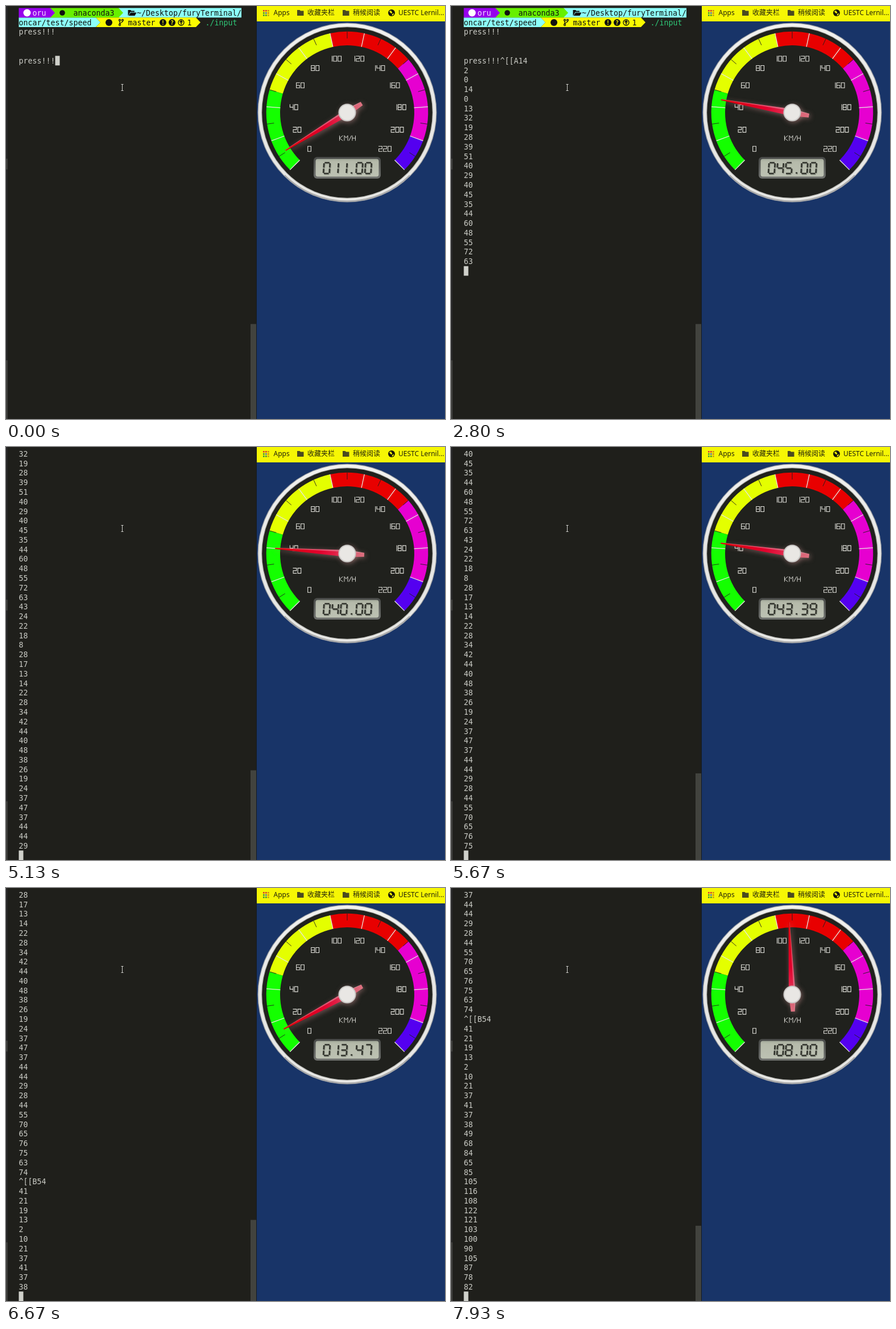
An HTML page that plays this animation: 772x725 px, repeating every 8000 ms.

```html
<!DOCTYPE html>
<html lang="en">
<head>
<meta charset="utf-8">
<title>Terminal and speedometer</title>
<style>
html, body { margin: 0; width: 100%; height: 100%; overflow: hidden; background: #1f1f1b; }
svg { display: block; width: 100vw; height: 100vh; }
.mono { font: 13.29px "DejaVu Sans Mono", monospace; white-space: pre; }
.bar { font: 12px "Noto Sans", "Noto Sans CJK SC", "Noto Sans CJK", sans-serif; fill: #22220a; }
.shadow { filter: drop-shadow(2px 2px 4px rgba(200, 143, 143, .5)); }
</style>
</head>
<body>
<svg viewBox="0 0 772 725" xmlns="http://www.w3.org/2000/svg">
  <defs>
    <linearGradient id="metal" x1="0" y1="0" x2="0" y2="1">
      <stop offset="0" stop-color="#f2f2f0"/><stop offset=".5" stop-color="#e6e6e4"/><stop offset="1" stop-color="#e9e9e6"/>
    </linearGradient>
    <linearGradient id="lcd" x1="0" y1="0" x2="0" y2="1">
      <stop offset="0" stop-color="#a3a99a"/><stop offset=".15" stop-color="#b5baaa"/><stop offset="1" stop-color="#bdc2b3"/>
    </linearGradient>
    <linearGradient id="lcdFrame" x1="0" y1="0" x2="0" y2="1">
      <stop offset="0" stop-color="#484a48"/><stop offset="1" stop-color="#70726f"/>
    </linearGradient>
    <linearGradient id="needleFill" gradientUnits="userSpaceOnUse" x1="0" y1="-127" x2="0" y2="30">
      <stop offset="0" stop-color="#dc0008"/><stop offset=".5" stop-color="#e2002c"/><stop offset=".8" stop-color="#e23658"/><stop offset="1" stop-color="#dc7482"/>
    </linearGradient>
  </defs>

  <rect width="772" height="725" fill="#1f1f1b"/>
  <g id="terminal" class="mono" fill="#cbccc6">
    <g id="prompt" fill="#101010">
      <path d="M198 3.5H414V20.3H198ZM22.5 20.3H158L166 28.7L158 37H22.5Z" fill="#8cfffa"/>
      <path d="M78 3.5H198L206 12L198 20.3H78Z" fill="#67f000"/>
      <path d="M22.5 3.5H78L86 12L78 20.3H22.5Z" fill="#9600ec"/>
      <path d="M158 20.3H334L342 28.7L334 37H158L166 28.7Z" fill="#fafa00"/>
      <circle cx="37" cy="12" r="6.5" fill="#fff"/>
      <circle cx="99" cy="12" r="4.8"/>
      <circle cx="181" cy="29" r="6"/>
      <path d="M214.5 17V7H219L220.5 8.5H226V10.5H218.5L215.5 16ZM219 11.5H229.5L226.5 17H215.5Z"/>
      <g fill="none" stroke="#101010" stroke-width="1.3">
        <path d="M200 26V32M205 26.5C205 30 200 28.5 200 32"/>
        <circle cx="200" cy="25" r="1.5"/><circle cx="200" cy="33" r="1.5"/><circle cx="205" cy="25" r="1.5"/>
        <circle cx="308" cy="29" r="5"/><path d="M308 32.5V26M305.5 28.5L308 26L310.5 28.5" stroke-width="1.7"/>
      </g>
      <circle cx="276" cy="29" r="6"/><circle cx="292" cy="29" r="6"/>
      <g fill="#fafa00" font-size="10" font-weight="bold" text-anchor="middle">
        <text x="276" y="32.7">!</text><text x="292" y="32.7">?</text>
      </g>
      <text x="46.5" y="16.9" fill="#f4e6ff">oru</text>
      <text x="118.5" y="16.9">anaconda3</text>
      <text x="230" y="16.9">~/Desktop/furyTerminal/</text>
      <text x="22.5" y="33.7">oncar/test/speed</text>
      <text x="214.5" y="33.7">master</text>
      <text x="318.5" y="33.7">1</text>
      <text x="350.5" y="33.7" fill="#2fc878">./input</text>
    </g>
    <rect id="cursor" width="8" height="16.8" fill="#cfd0ca"/>
  </g>
  <path d="M202.5 137.5H206.5M204.5 138V148M202.5 148.5H206.5" fill="none" stroke="#d0d0cc"/>
  <rect width="3" height="725" fill="#262626"/>
  <path d="M0 268H3V287H0ZM0 622H3V725H0Z" fill="#3d3d3b"/>
  <rect id="thumb" x="430" width="10" fill="#42433e"/>
  <rect x="440" width="1" height="725" fill="#141a22"/>

  <rect x="441" y="27" width="331" height="698" fill="#183468"/>
  <rect x="441" width="331" height="27" fill="#f6f604"/>
  <g id="apps"></g>
  <g fill="#4a4a20">
    <path id="folder" d="M512 7H516.5L518 8.5H523.5V17H512Z"/>
    <use href="#folder" x="80"/>
  </g>
  <circle cx="678" cy="12" r="6" fill="#17170c"/>
  <path d="M674 9.5C676 7.5 678 8 678 9.5S680 11 679 12.5S675 11.5 674 9.5M679 14.5L682 12.5C682.5 15 680 17 678.5 16.5Z" fill="#f6f604"/>
  <g class="bar">
    <text x="470.5" y="16.3">Apps</text>
    <text x="530" y="16.3">收藏夹栏</text>
    <text x="610" y="16.3">稍候阅读</text>
    <text x="690" y="16.3">UESTC Lernil...</text>
  </g>

  <g transform="translate(600 187)">
    <circle r="157.5" fill="#9b9ea2"/>
    <circle r="156.3" fill="url(#metal)"/>
    <path d="M-110 110A155.6 155.6 0 0 0 110 110" fill="none" stroke="#aaa" stroke-width="2"/>
    <circle r="151" fill="#b4b4b0"/>
    <circle r="149.8" fill="#20211d"/>
    <g id="dial"></g>
    <rect x="-59" y="78" width="118" height="38" rx="6" fill="url(#lcdFrame)"/>
    <rect x="-55.5" y="81.5" width="111" height="31" rx="4" fill="url(#lcd)"/>
    <path id="digitShade" transform="translate(8.5 1.2) skewX(-4)" fill="none" stroke="#8f9487" stroke-width="2.8"/>
    <path id="digits" transform="translate(7.5 0) skewX(-4)" fill="none" stroke="#33352e" stroke-width="2.7"/>
    <g class="shadow">
      <g id="needle">
        <path d="M-1 -127H1L6 0L3.5 30H-3.5L-6 0Z" fill="url(#needleFill)"/>
        <path d="M.5 -127H1L6 0L3.5 30Z" fill="#d8f0f0" fill-opacity=".33"/>
      </g>
    </g>
    <g class="shadow">
      <circle r="15.5" fill="#c9c8c6"/>
      <circle r="13.5" fill="#e9e7e4"/>
    </g>
  </g>
</svg>
<script>
const LOOP = 8000, FPS = 15 / 1000, ROUNDING = 4, ROW = 16.78, ROWS = 43, LEFT = 22.5, CHAR = 8;
const $ = id => document.getElementById(id);

function add(parent, tag, attrs, text) {
  const node = document.createElementNS('http://www.w3.org/2000/svg', tag);
  for (const key in attrs) node.setAttribute(key, attrs[key]);
  if (text) node.textContent = text;
  return parent.appendChild(node);
}

// Seven-segment lettering
const SEGMENTS = ['abcdef', 'bc', 'abdeg', 'abcdg', 'bcfg', 'acdfg', 'acdefg', 'abc', 'abcdefg', 'abcdfg'];
function segmentDigit(digit, x, y, w, h, gap) {
  const flat = dy => `M${x + gap} ${y + dy}h${w - 2 * gap}`;
  const tall = (dx, dy) => `M${x + dx} ${y + dy + gap}v${h / 2 - 2 * gap}`;
  const shape = {
    a: flat(0), b: tall(w, 0), c: tall(w, h / 2), d: flat(h),
    e: tall(0, h / 2), f: tall(0, 0), g: flat(h / 2)
  };
  return [...SEGMENTS[digit]].map(s => shape[s]).join('');
}

// Dial: 220 units over 270 degrees
const angle = value => value * 270 / 220 - 135;
function polar(value, r) {
  const a = angle(value) * Math.PI / 180;
  return [r * Math.sin(a), -r * Math.cos(a)];
}
function buildDial() {
  const dial = $('dial');
  const bands = [[0, 50, '#14ff00'], [50, 100, '#e4ff00'], [100, 150, '#e80000'], [150, 200, '#e600d0'], [200, 220, '#5400f0']];
  for (const [from, to, fill] of bands)
    add(dial, 'path', { fill, d: `M${polar(from, 142.3)}A142.3 142.3 0 0 1 ${polar(to, 142.3)}L${polar(to, 118)}A118 118 0 0 0 ${polar(from, 118)}Z` });
  for (let v = 0; v <= 220; v += 10) {
    const major = v % 20 === 0;
    add(dial, 'path', {
      d: `M${polar(v, 142.3)}L${polar(v, major ? 118 : 130)}`,
      stroke: major ? '#e8e8e0' : '#20211d', 'stroke-width': major ? 1.3 : .9
    });
    if (major) addLabel(dial, v);
  }
  add(dial, 'path', {
    d: 'M-13.5 40.5v9M-7.5 40.5l-6 4.5l6 4.5M-5 49.5v-9l3 4l3 -4v9M3 49.5l4.5 -9M9 40.5v9M14.5 40.5v9M9 45h5.5',
    fill: 'none', stroke: '#d8d8d2'
  });
}
function addLabel(parent, value) {
  const gap = 2.3;
  let x = 0, d = '';
  for (const ch of String(value)) {
    const w = ch === '1' ? 3 : 5.7;
    d += segmentDigit(+ch, x, -4.5, w, 9, 0);
    x += w + gap;
  }
  const [cx, cy] = polar(value, 94);
  add(parent, 'path', {
    d, transform: `translate(${cx - (x - gap) / 2} ${cy - 2.7})`,
    fill: 'none', stroke: '#e2e2dc', 'stroke-width': 1.1, 'stroke-linecap': 'square'
  });
}

function buildApps() {
  const colors = ['#d63a2f', '#d63a2f', '#d68a10', '#3c9a3c', '#4a6ac8', '#d68a10', '#3c9a3c', '#3c9a3c', '#c8a010'];
  colors.forEach((fill, i) => add($('apps'), 'rect', { x: 452 + i % 3 * 4, y: 7 + (i / 3 | 0) * 4, width: 2.7, height: 2.7, fill }));
}

// Terminal output: first printed line is on row 5
const FIRST = 5;
const printed = ('press!!!^[[A14 2 0 14 0 13 32 19 28 39 51 40 29 40 45 35 44 60 48 55 72 63 43 24 22 18 8 28 17 13 14 ' +
  '22 28 34 42 44 40 48 38 26 19 24 37 47 37 44 44 29 28 44 55 70 65 76 75 63 74 ^[[B54 41 21 19 13 2 10 21 37 41 37 ' +
  '38 49 68 84 65 85 105 116 108 122 121 103 100 90 105 87 78 82').split(' ');

// Bursts of output: start, end, number of lines
const bursts = [[1200, 1200, 1], [1200, 1530, 6], [1670, 1870, 4], [2070, 2070, 1], [2070, 2800, 10], [2930, 3130, 4],
  [3270, 3930, 10], [4130, 4930, 11], [5130, 5930, 12], [6000, 6200, 4], [6270, 6800, 8], [6870, 7130, 5],
  [7270, 7530, 5], [7670, 7930, 5]];
const printTimes = bursts.flatMap(([from, to, n]) =>
  Array.from({ length: n }, (_, i) => from + (n > 1 ? i * (to - from) / (n - 1) : 0)));

const addLine = (row, text) => add($('terminal'), 'text', { x: LEFT, y: 16.9 + row * ROW }, text);
addLine(2, 'press!!!');
const typed = addLine(FIRST, 'press!!!');
const lines = printed.map((text, i) => addLine(FIRST + i, text));

function drawTerminal(t) {
  const count = printTimes.filter(time => time <= t + ROUNDING).length;
  const row = FIRST + count, scroll = Math.max(0, row - ROWS + 1);
  const input = t < 930 ? 'press!!!' : 'press!!!^[[A';
  typed.textContent = count ? '' : input;
  lines.forEach((line, i) => line.setAttribute('display', i < count ? 'inline' : 'none'));
  $('cursor').setAttribute('x', LEFT + (count ? 0 : input.length * CHAR));
  $('cursor').setAttribute('y', 3.6 + row * ROW);
  $('terminal').setAttribute('transform', `translate(0 ${-scroll * ROW})`);
  const height = 725 * ROWS / (187 + scroll);
  $('thumb').setAttribute('y', 725 - height);
  $('thumb').setAttribute('height', height);
}

// Gauge targets: start time, value
const targets = [[1191, 14], [2210, 45], [3240, 18], [4240, 40], [5240, 44], [6210, 10], [7272, 108]];
const TWEEN = 590;
const ease = p => p < .5 ? 2 * p * p : 1 - 2 * (1 - p) ** 2;
function speedAt(t) {
  let speed = 11;
  for (const [start, value] of targets)
    speed += (value - speed) * ease(Math.min(1, Math.max(0, (t - start) / TWEEN)));
  return speed;
}

const CELLS = [-43, -28, -13, 0, 14.5, 30];
function drawGauge(t) {
  const speed = speedAt(t);
  $('needle').setAttribute('transform', `rotate(${angle(speed)})`);
  const d = [...speed.toFixed(2).padStart(6, '0')].map((ch, i) =>
    ch === '.' ? 'M6 106h3' : segmentDigit(+ch, CELLS[i] + 1, 88, 10.5, 19, 1)).join('');
  $('digits').setAttribute('d', d);
  $('digitShade').setAttribute('d', d);
}

function draw(now) {
  const t = Math.floor((now % LOOP + ROUNDING) * FPS) / FPS;
  drawTerminal(t);
  drawGauge(t);
}

buildApps();
buildDial();
const begin = performance.now();
function tick() {
  draw(performance.now() - begin);
  requestAnimationFrame(tick);
}
tick();
</script>
</body>
</html>
```
